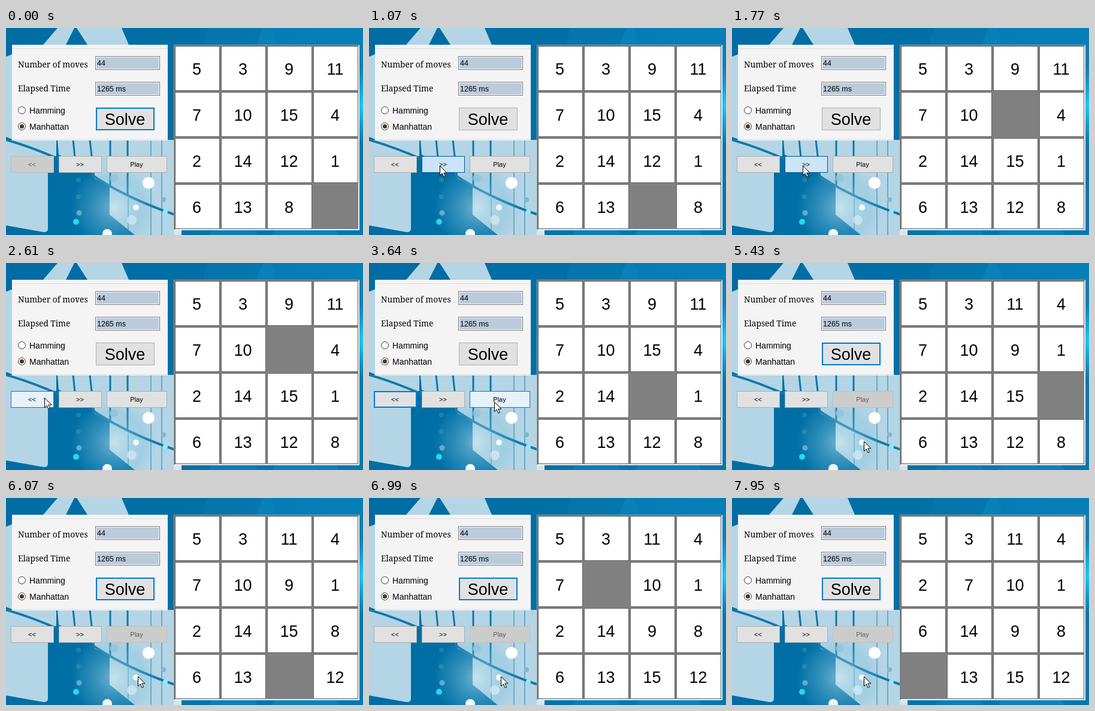
Write an HTML page that moves like this. It is 596 px wide and 346 px high and loops after 8 s.

```html
<!DOCTYPE html>
<html lang="en">
<head>
<meta charset="utf-8">
<title>Puzzle solver</title>
<style>
  html, body { margin: 0; width: 100%; height: 100%; overflow: hidden; background: #0070a6; }
  svg { display: block; width: 596px; height: 346px; }
  text { font-family: "Liberation Sans", Arial, sans-serif; fill: #000; }
  .label { font: 13.7px "Noto Serif", serif; }
  .field { font-size: 12.5px; }
  .radio { font-size: 14px; }
  .num { font-size: 27px; text-anchor: middle; }
  .btn { text-anchor: middle; }
</style>
</head>
<body>
<svg viewBox="0 0 596 346">
  <defs>
    <linearGradient id="sky" x1="0" y1="0" x2="1" y2="0.3">
      <stop offset="0" stop-color="#006ca3"/>
      <stop offset="0.55" stop-color="#0070a6"/>
      <stop offset="1" stop-color="#0078b0"/>
    </linearGradient>
    <radialGradient id="glow">
      <stop offset="0" stop-color="#d5edf5" stop-opacity="0.55"/>
      <stop offset="0.7" stop-color="#6db9d8" stop-opacity="0.25"/>
      <stop offset="1" stop-color="#6db9d8" stop-opacity="0"/>
    </radialGradient>
    <radialGradient id="cyan">
      <stop offset="0" stop-color="#18d0ff"/>
      <stop offset="1" stop-color="#18b0f0" stop-opacity="0"/>
    </radialGradient>
  </defs>

  <rect width="596" height="346" fill="url(#sky)"/>
  <g fill="#b4d5e5">
    <path d="M86 0H114L100 28H62Z"/>
    <path d="M118 0H193L205 28H136Z"/>
    <path d="M0 48L10 44V186L0 182Z"/>
    <path d="M0 187H84V214H70V335Q70 342 62 341L0 330Z"/>
    <path d="M86 187H282V346H215L173 312V264L148 252L140 232L88 212Z"/>
  </g>
  <g fill="none" stroke="#0f78ab">
    <path d="M0 187Q40 198 90 220" stroke-width="4"/>
    <path d="M144 246Q200 284 282 312" stroke-width="4"/>
    <path d="M112 187L116 226M140 187L147 250M174 187V264M203 187V280" stroke-width="3"/>
    <path d="M204 284V346M242 187V346M260 187V346" stroke-width="1.500" opacity="0.6"/>
  </g>
  <rect x="280" y="336" width="13" height="10" fill="#d5e7ee"/>
  <circle cx="180" cy="300" r="72" fill="url(#glow)"/>
  <circle cx="525" cy="55" r="110" fill="#1b98d5" opacity="0.25"/>
  <circle cx="390" cy="30" r="60" fill="#2796cb" opacity="0.15"/>
  <circle cx="600" cy="130" r="65" fill="url(#cyan)"/>
  <circle cx="500" cy="370" r="60" fill="#2aa5d8" opacity="0.25"/>
  <circle cx="380" cy="365" r="45" fill="#2aa5d8" opacity="0.2"/>
  <circle cx="238" cy="259" r="10" fill="#fff"/>
  <circle cx="217" cy="300" r="5" fill="#f2f9fc"/>
  <circle cx="169" cy="344" r="8" fill="#f2f9fc"/>
  <circle cx="210" cy="321" r="8" fill="#d9ebf2" opacity="0.7"/>
  <circle cx="180" cy="251" r="7" fill="#8fc4db" opacity="0.8"/>
  <circle cx="117" cy="324" r="5" fill="#25d7f7"/>
  <circle cx="122" cy="309" r="4.5" fill="#64abcc"/>
  <circle cx="121" cy="282" r="4" fill="#2b87ad"/>
  <circle cx="121" cy="254" r="4" fill="#1a84a2"/>
  <circle cx="263" cy="287" r="4" fill="#7ab9d3"/>
  <circle cx="266" cy="307" r="4" fill="#8eeafa"/>

  <rect x="10" y="28" width="260" height="160" fill="#f4f4f4"/>
  <path d="M10 34.500H270M10 186.500H270" stroke="#dcdcdc"/>
  <text class="label" x="20" y="66">Number of moves</text>
  <text class="label" x="20" y="106">Elapsed Time</text>
  <g fill="#fff" stroke="#7a7a7a">
    <rect x="149.500" y="47.500" width="107" height="22"/>
    <rect x="149.500" y="90.500" width="107" height="22"/>
  </g>
  <path d="M151 49h104v19h-104zM151 92h104v19h-104z" fill="#bccbdc"/>
  <text class="field" x="152" y="63">44</text>
  <text class="field" x="152" y="106">1265 ms</text>
  <g fill="#fff" stroke="#333">
    <circle cx="26.500" cy="137.500" r="6"/>
    <circle cx="26.500" cy="164.500" r="6"/>
  </g>
  <circle cx="26.500" cy="164.500" r="3.600" fill="#4d3428"/>
  <text class="radio" x="39" y="143">Hamming</text>
  <text class="radio" x="39" y="170">Manhattan</text>
  <g id="buttons"/>

  <rect x="280" y="28" width="310" height="310" fill="#fff"/>
  <path d="M280 338V28H590L589 29H281V337Z" fill="#a0a0a0"/>
  <rect x="281" y="29" width="308" height="308" fill="#696969"/>
  <rect x="282" y="30" width="307" height="307" fill="#e3e3e3"/>
  <rect x="282" y="30" width="306" height="306" fill="#808080"/>
  <g id="tiles"/>
  <path id="cursor" d="M.5 .5V16.500L4.200 13L7 19L9.500 18L6.800 12H12Z" fill="#fff" stroke="#000"/>
</svg>
<script>
const LOOP = 8000;
const $ = id => document.getElementById(id);

function add(parent, tag, attrs, text) {
  const el = document.createElementNS('http://www.w3.org/2000/svg', tag);
  for (const k in attrs) el.setAttribute(k, attrs[k]);
  if (text) el.textContent = text;
  return parent.appendChild(el);
}

const start = [5, 3, 9, 11, 7, 10, 15, 4, 2, 14, 12, 1, 6, 13, 8, 0];
const step = { L: -1, R: 1, U: -4, D: 4 };
// Moves of the empty cell: clicks first, then automatic play
const moves = [[830, 'L'], [1140, 'U'], [1450, 'U'], [1830, 'U'], [2610, 'D'], [3000, 'D'],
  [4170, 'U'], [4490, 'U'], [4810, 'R'], [5110, 'D'], [5430, 'D'], [5750, 'D'], [6070, 'L'],
  [6370, 'U'], [6690, 'U'], [6990, 'L'], [7310, 'L'], [7630, 'D'], [7950, 'D']];

const tiles = start.map(n => {
  if (!n) return null;
  const g = add($('tiles'), 'g', {});
  add(g, 'rect', { x: 0.5, y: 0.5, width: 74, height: 74, fill: '#fff', stroke: '#646464' });
  add(g, 'text', { x: 36.5, y: 48, class: 'num' }, String(n));
  return { n, g };
}).filter(Boolean);

function boardAt(t) {
  const grid = start.slice();
  let gap = 15;
  for (const [at, dir] of moves) {
    if (t < at) break;
    const next = gap + step[dir];
    grid[gap] = grid[next];
    grid[next] = 0;
    gap = next;
  }
  return grid;
}

function makeButton(x, y, w, h, label, size, base) {
  const g = add($('buttons'), 'g', {});
  const box = add(g, 'rect', {});
  const text = add(g, 'text', { x: x + w / 2 - 0.5, y: base, class: 'btn', 'font-size': size }, label);
  return { x, y, w, h, box, text };
}
const solve = makeButton(150, 133, 98, 38, 'Solve', 27, 162);
const back = makeButton(8, 214, 72, 28, '<<', 11, 232);
const forward = makeButton(88, 214, 72, 28, '>>', 11, 232);
const play = makeButton(168, 214, 101, 28, 'Play', 11, 232);

const looks = {
  normal: ['#e1e1e1', '#adadad', 1],
  focus: ['#e1e1e1', '#0078d7', 2],
  hover: ['#e5f1fb', '#0078d7', 1],
  pressed: ['#cce4f7', '#005499', 1],
  disabled: ['#cccccc', '#bfbfbf', 1]
};

function paint(b, look) {
  const [fill, stroke, line] = looks[look];
  const attrs = { x: b.x + line / 2, y: b.y + line / 2, width: b.w - line, height: b.h - line,
    fill, stroke, 'stroke-width': line };
  for (const k in attrs) b.box.setAttribute(k, attrs[k]);
  b.text.style.fill = look === 'disabled' ? '#5c5c5c' : '#000';
}

// Mouse legs: first step, last step, number of steps, end point
const legs = [[120, 600, 7, 118, 230], [2150, 2380, 4, 64, 225],
  [3170, 3640, 7, 209, 232], [4490, 4650, 3, 220, 298]];

function mouseAt(t) {
  let x = 318.7, y = 315;
  for (const [from, to, n, ex, ey] of legs) {
    if (t < from) break;
    const gap = (to - from) / (n - 1);
    const k = Math.min(n, Math.floor((t - from) / gap + 0.02) + 1) / n;
    x += (ex - x) * k;
    y += (ey - y) * k;
  }
  return [Math.round(x), Math.round(y)];
}

const presses = [[680, 830], [1070, 1140], [1370, 1450], [1770, 1830], [2530, 2610],
  [2930, 3000], [3870, 3940]];

function focusAt(t) {
  if (t < 680 || t >= 3940) return solve;
  if (t < 2530) return forward;
  return t < 3870 ? back : play;
}

function render(t) {
  boardAt(t).forEach((n, i) => {
    if (!n) return;
    const tile = tiles.find(o => o.n === n);
    tile.g.setAttribute('transform', `translate(${282 + i % 4 * 77} ${30 + (i >> 2) * 77})`);
  });

  const [mx, my] = mouseAt(t);
  $('cursor').setAttribute('transform', `translate(${mx} ${my})`);
  $('cursor').setAttribute('visibility', t < 120 ? 'hidden' : 'visible');

  const down = presses.some(([a, b]) => t >= a && t < b);
  const focused = focusAt(t);
  for (const b of [solve, back, forward, play]) {
    const over = mx >= b.x && mx < b.x + b.w && my >= b.y && my < b.y + b.h;
    let look = b === focused ? 'focus' : 'normal';
    if (over) look = down ? 'pressed' : 'hover';
    if (b === back && t < 830 || b === play && t >= 3940) look = 'disabled';
    paint(b, look);
  }
}

function tick() {
  render(performance.now() % LOOP);
  requestAnimationFrame(tick);
}
tick();
</script>
</body>
</html>
```
